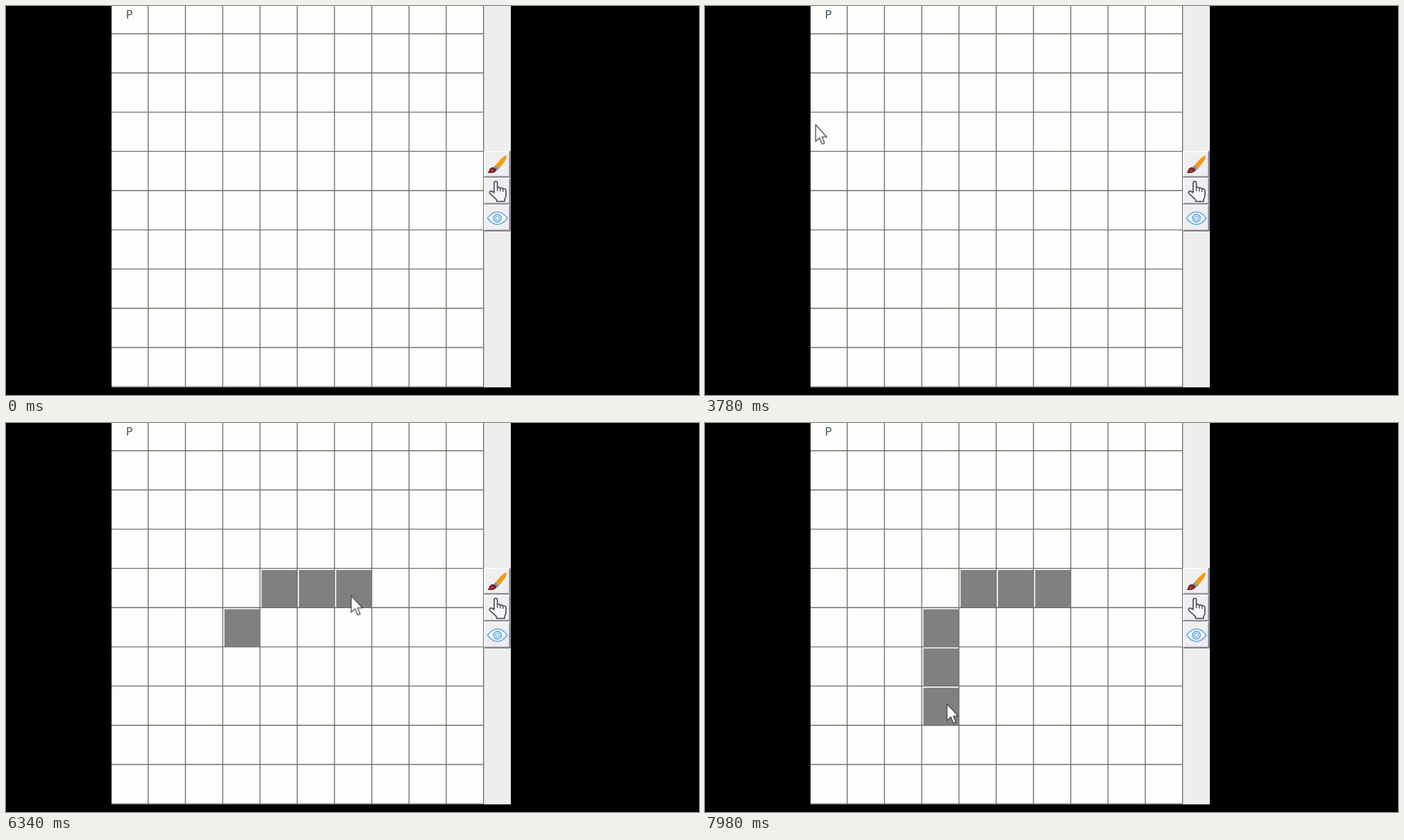
An HTML page that plays this animation: 998 px wide and 561 px high, repeating every 8000 ms.

```html
<!DOCTYPE html>
<html lang="en">
<head>
<meta charset="utf-8">
<title>Grid painter</title>
<style>
html, body { margin: 0; height: 100%; overflow: hidden; background: #000; }
svg { display: block; }
#lines { stroke: #70706a; stroke-width: 1.35; fill: none; }
#cells rect { fill: #808080; opacity: 0; animation: 8s step-end infinite; }
#cells rect:nth-child(1) { animation-name: paint1; }
#cells rect:nth-child(2) { animation-name: paint2; }
#cells rect:nth-child(3) { animation-name: paint3; }
#cells rect:nth-child(4) { animation-name: paint4; }
#cells rect:nth-child(5) { animation-name: paint5; }
#cells rect:nth-child(6) { animation-name: paint6; }
@keyframes paint1 { 0% { opacity: 0 } 58.45%, 100% { opacity: 1 } }
@keyframes paint2 { 0% { opacity: 0 } 65.45%, 100% { opacity: 1 } }
@keyframes paint3 { 0% { opacity: 0 } 74.7%, 100% { opacity: 1 } }
@keyframes paint4 { 0% { opacity: 0 } 78.7%, 100% { opacity: 1 } }
@keyframes paint5 { 0% { opacity: 0 } 89.2%, 100% { opacity: 1 } }
@keyframes paint6 { 0% { opacity: 0 } 99.45%, 100% { opacity: 1 } }

#cursor { animation: move 8s linear infinite; }
@keyframes move {
  0%, 21.5% { transform: translate(730px, 252px) }
  24.4% { transform: translate(714px, 238px) }
  27.5% { transform: translate(706px, 226px) }
  31%, 32.5% { transform: translate(708px, 230px) }
  36.25% { transform: translate(715px, 224.5px) }
  38.25% { transform: translate(729px, 251px) }
  40.5% { transform: translate(729px, 268px) }
  41.25% { transform: translate(700px, 284px) }
  42.5% { transform: translate(520px, 276px) }
  45% { transform: translate(134px, 245px) }
  47% { transform: translate(134px, 173px) }
  47.25% { transform: translate(158.5px, 170.5px) }
  51% { transform: translate(240px, 215px) }
  54.5% { transform: translate(339px, 296px) }
  56.5%, 60.75% { transform: translate(332px, 300px) }
  63.25% { transform: translate(362px, 268px) }
  65.75%, 68.25% { transform: translate(384px, 240px) }
  70.25% { transform: translate(402px, 222px) }
  72.25% { transform: translate(431.5px, 210.5px) }
  74.75% { transform: translate(447px, 238px) }
  76.25% { transform: translate(472px, 282px) }
  78.5%, 78.75% { transform: translate(502px, 246px) }
  81.25% { transform: translate(476px, 258px) }
  83.75% { transform: translate(418px, 280px) }
  86.25% { transform: translate(364.5px, 307.5px) }
  88.75%, 89.5% { transform: translate(346px, 344px) }
  93% { transform: translate(350px, 395px) }
  95.5% { transform: translate(354px, 435px) }
  99.25%, 100% { transform: translate(348px, 404.5px) }
}
</style>
</head>
<body>
<svg width="998" height="561" viewBox="0 0 998 561">
  <defs>
    <clipPath id="window"><rect x="152" width="575" height="550"/></clipPath>
    <g id="button">
      <rect width="38" height="38.5" fill="#efeff2"/>
      <path d="M.7 38V.7H37" fill="none" stroke="#fff" stroke-width="1.4"/>
      <path d="M0 37.6H37.2V0" fill="none" stroke="#6c6a78" stroke-width="1.6"/>
      <path d="M2 36.2H35.8V2" fill="none" stroke="#bdbcc6" stroke-width="1"/>
    </g>
  </defs>
  <rect width="998" height="561"/>
  <g clip-path="url(#window)">
    <rect x="152" width="536" height="550" fill="#fdfdfc"/>
    <rect x="688" width="39" height="550" fill="#eeedf0"/>
    <g id="cells"></g>
    <path id="lines"/>
    <text x="172.7" y="18" font-family="'Noto Sans', 'Open Sans', sans-serif" font-size="16.5" fill="#3f5158">P</text>

    <use href="#button" x="688.5" y="209"/>
    <use href="#button" x="688.5" y="247.8"/>
    <use href="#button" x="688.5" y="286.5"/>

    <!-- brush -->
    <path d="M720.5 215.5q1.5 3-2 8l-8 10.5-5.5-4.5 8-9q4-4 7.500-5z" fill="#f79a0e"/>
    <path d="M705 229.500l5.500 4.500-4 4-5-4.500z" fill="#8d949a"/>
    <path d="M701.500 232.500q5 1.500 4.500 5-3 4.500-12.500 3 2.500-2 2.500-4.500 1.500-3.500 5.500-3.500z" fill="#5a2b2b"/>
    <path d="M700 234.500q3 1 3 3-2.500 2.500-6 2 .5-4.500 3-5z" fill="#c62f2f"/>

    <!-- pointing hand -->
    <path d="M703 269v-13.500q0-2.700 2.300-2.700t2.300 2.700v6.500q2.700-1.700 4.200.8 2.700-1.200 4 1 3.700-1 4.200 2.200v7q0 3-2 5.500v3.300h-11.500v-2.500l-9.500-8.800q-1.500-2 .3-3.300 1.700-1 3.200.3z" fill="#f5f5f7" stroke="#45454f" stroke-width="1.6" stroke-linejoin="round"/>
    <path d="M707.600 262v5M711.800 263v4.500M715.800 264v4" fill="none" stroke="#45454f" stroke-width="1.3"/>

    <!-- eye -->
    <g fill="#f3f8fc" stroke="#69a9da" stroke-width="1.6">
      <path d="M693.500 306q6.500-9 14.200-9t14.200 9q-6.500 9-14.200 9t-14.200-9z"/>
      <circle cx="707.700" cy="306" r="5.600" fill="#c9e4f6"/>
      <circle cx="707.700" cy="306" r="2.600" fill="#eaf5fc" stroke-width="1"/>
    </g>

    <path id="cursor" d="M.5.500V24.500L6 19.500 9.700 28.300 13.300 26.800 9.700 18.200H16.700Z" fill="#fff" stroke="#44444c" stroke-width="1.3" stroke-linejoin="round"/>
  </g>
</svg>
<script>
const colX = i => 151.1 + 53.66 * i;
const rowY = i => -16.6 + 56.57 * i;

let d = "";
for (let i = 1; i <= 10; i++) d += `M${colX(i)} 0V550M152 ${rowY(i)}H688`;
document.getElementById("lines").setAttribute("d", d);

// column and row of each cell, in painting order
const painted = [[3, 5], [4, 4], [5, 4], [6, 4], [3, 6], [3, 7]];
document.getElementById("cells").innerHTML = painted.map(([c, r]) =>
  `<rect x="${colX(c) + 2.4}" y="${rowY(r) + 2.3}" width="51.5" height="54.5"/>`).join("");
</script>
</body>
</html>
```
